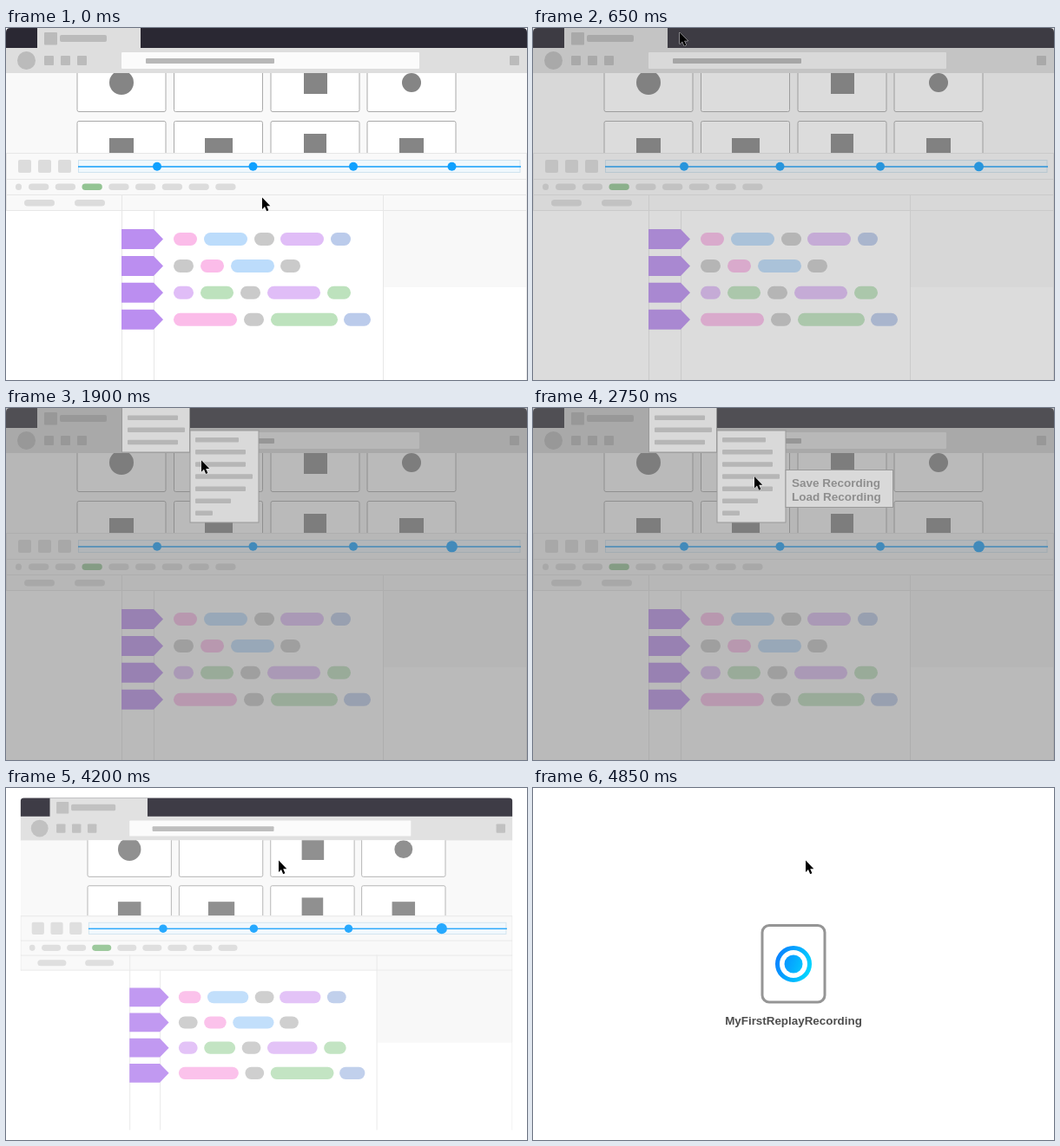
Animation, 600 px wide and 406 px high, one loop 7 s. Source, as an HTML page:

```html
<!DOCTYPE html>
<html lang="en">
<head>
<meta charset="utf-8">
<title>Save a recording</title>
<style>
  html, body { margin: 0; width: 100%; height: 100%; overflow: hidden; background: #fff; }
  svg { display: block; width: 600px; height: 406px; }
  text { font-family: "Liberation Sans", Arial, sans-serif; font-weight: bold; }
</style>
</head>
<body>
<svg id="stage" viewBox="0 0 600 406">
  <defs>
    <clipPath id="frame"><path d="M0 406V5Q0 0 5 0H595Q600 0 600 5V406Z"/></clipPath>
    <clipPath id="view"><rect y="52" width="600" height="92"/></clipPath>
    <linearGradient id="blue" gradientUnits="userSpaceOnUse" x1="281" y1="196" x2="319" y2="210">
      <stop offset="0" stop-color="#0a84ff"/><stop offset="1" stop-color="#00d5ff"/>
    </linearGradient>
  </defs>
  <g id="browser"><g id="page" clip-path="url(#frame)"></g></g>
  <g id="shade"><rect width="600" height="406" fill="#767676" fill-opacity=".5"/></g>
  <g id="menu"></g>
  <g id="submenu"></g>
  <g id="popup">
    <g id="popupBox"></g>
    <text id="save" x="298" y="90.5" font-size="13.5">Save Recording</text>
    <text x="298" y="106.7" font-size="13.5" fill="#8e8e8e">Load Recording</text>
  </g>
  <g id="file">
    <rect x="264" y="158.5" width="72" height="88.5" rx="8" fill="#fff" stroke="#959595" stroke-width="3"/>
    <circle cx="300" cy="203" r="18.5" fill="none" stroke="url(#blue)" stroke-width="5"/>
    <circle cx="300" cy="203" r="10.5" fill="url(#blue)"/>
    <text x="300" y="273" font-size="13.4" text-anchor="middle" fill="#4d4d4d">MyFirstReplayRecording</text>
  </g>
  <path id="cursor" d="M0 0V13.4L3 10.6L5.2 15.7L7.4 14.7L5.2 9.8H9.3Z" fill="#000"
        stroke="#fff" stroke-width=".8" paint-order="stroke"/>
</svg>
<script>
const NS = 'http://www.w3.org/2000/svg';
const $ = id => document.getElementById(id);

function add(parent, tag, attrs) {
  const el = document.createElementNS(NS, tag);
  for (const k in attrs) el.setAttribute(k, attrs[k]);
  return parent.appendChild(el);
}
// Rectangle given by its left, top, right and bottom edges.
const box = (parent, l, t, r, b, fill, rx = 0, extra = {}) =>
  add(parent, 'rect', { x: l, y: t, width: r - l, height: b - t, fill, rx, ...extra });
const dot = (parent, cx, cy, r, fill) => add(parent, 'circle', { cx, cy, r, fill });

function drawChrome(g) {
  const tone = '#bbb';
  box(g, 0, 0, 600, 406, '#fff');
  box(g, 0, 0, 600, 23, '#2a2833');
  box(g, 36, 0, 155, 24, '#dedede');
  box(g, 0, 23, 600, 52.5, '#dedede');
  box(g, 44, 5, 59, 19.5, tone, 1);
  box(g, 62, 8, 116, 16, tone, 2);
  dot(g, 23.5, 37.5, 10.5, tone);
  for (const x of [44, 63, 82, 580]) box(g, x, 32, x + 11, 43, tone, 1);
  box(g, 133, 28, 476, 47, '#fbfbfb', 1);
  box(g, 161, 35, 309, 41, '#b7b7b7', 1);
}

function drawSites(page) {
  const g = add(page, 'g', { 'clip-path': 'url(#view)' });
  const tone = '#858585';
  box(g, 0, 52, 600, 144, '#f9f9f9');
  for (const top of [39.5, 107.5])
    for (const x of [82, 193.5, 305, 416])
      box(g, x, top, x + 102, top + 57, '#fff', 2, { stroke: '#aaa', 'stroke-width': 1 });
  dot(g, 133, 63, 14, tone);
  box(g, 343, 50, 370, 76, tone);
  dot(g, 467, 63, 11, tone);
  for (const [l, t, r] of [[119, 127, 147], [229, 127, 261], [343, 122, 369], [453, 127, 481]])
    box(g, l, t, r, t + r - l, tone);
}

function drawTools(g) {
  const tone = '#dcdcdc';
  box(g, 0, 144, 600, 211, '#f9f9f9');
  box(g, 435, 211, 600, 299, '#f8f8f8');
  add(g, 'path', {
    d: 'M0 144.5H600M0 174.5H600M0 192.5H600M0 210.5H600M.5 144V211M599.5 144V406' +
       'M133.5 192V406M434.5 192V406M170.5 211V406',
    stroke: '#e7e7e7', fill: 'none'
  });
  for (const x of [14, 37, 60]) box(g, x, 152, x + 15, 167, tone, 2);
  box(g, 83.5, 152.5, 592, 166.5, '#f0f8fd', 0, { stroke: '#cfe3ef' });
  box(g, 83, 159.2, 593, 160.7, '#149ffb');
  box(g, 11, 179.5, 18, 187, tone, 3.5);
  for (let i = 0; i < 8; i++) {
    const x = 26 + i * 30.75;
    box(g, x, 179.5, x + 23.3, 187, i === 2 ? '#93c493' : tone, 3.75);
  }
  for (const x of [21, 79]) box(g, x, 198, x + 35, 205.5, tone, 3.75);
  return [174, 284.5, 400, 513.5].map(x => dot(g, x, 159.8, 5, '#0fa0ff')).pop();
}

function drawLog(g) {
  const tones = { k: '#fbbce9', b: '#bcdcfb', g: '#cacaca', p: '#e0bdf7', n: '#bde2bd', s: '#bbcbeb' };
  const rows = [
    ['kbgps', 193, 220, 228, 278, 286, 309, 316, 366, 374, 397],
    ['gkbg', 193, 216, 224, 251, 259, 309, 316, 339],
    ['pngpn', 193, 216, 224, 262, 270, 293, 301, 362, 370, 397],
    ['kgns', 193, 266, 274, 297, 305, 382, 389, 420]
  ];
  rows.forEach(([keys, ...edges], i) => {
    const y = 243.5 + i * 30.9;
    add(g, 'path', { d: `M133 ${y - 11.5}H170L181 ${y}L170 ${y + 11.5}H133Z`, fill: '#bb8ef0' });
    [...keys].forEach((k, j) =>
      box(g, edges[2 * j], y - 7.5, edges[2 * j + 1], y + 7.5, tones[k], 7.5));
  });
}

function panel(g, l, t, r, b) {
  box(g, l + .5, t + .5, r - .5, b - .5, '#d9d9d9', 0, { stroke: '#999' });
}
function bars(g, x, top, widths) {
  widths.forEach((w, i) => box(g, x, top + i * 14.1, x + w, top + i * 14.1 + 5.5, '#b6b6b6', 1));
}

const page = $('page');
drawChrome(page);
drawSites(page);
const lastDot = drawTools(page);
drawLog(page);
panel($('menu'), 133, -1, 212, 51.5);
bars($('menu'), 140, 8.5, [58, 66, 58]);
panel($('submenu'), 211.5, 25.5, 291.5, 132.5);
bars($('submenu'), 218, 34, [50, 58, 58, 66, 58, 41, 20]);
panel($('popupBox'), 290.5, 71, 415, 115);

const LOOP = 7000, TICK = 50;
const span = (t, a, b) => Math.min(1, Math.max(0, (t - a) / (b - a)));
const inOut = u => u < .5 ? 2 * u * u : 1 - 2 * (1 - u) ** 2;
const out = u => 1 - (1 - u) ** 2;
const mix = (a, b, u) => a + (b - a) * u;

// Cursor moves: start, end, x, y
const moves = [[400, 600, 169, 5], [1100, 1300, 168.5, 25], [1760, 2000, 255, 79], [2800, 3050, 314, 83.5]];

function cursorAt(t) {
  let x = 295, y = 195.5;
  for (const [a, b, tx, ty] of moves) {
    const u = inOut(span(t, a, b));
    x = mix(x, tx, u);
    y = mix(y, ty, u);
  }
  return [x, y];
}

function place(id, opacity, transform) {
  $(id).setAttribute('opacity', opacity);
  $(id).setAttribute('transform', transform);
}
const zoom = (s, x, y) => `translate(${x} ${y}) scale(${s}) translate(${-x} ${-y})`;

function render(t) {
  const leave = span(t, 3700, 3900);
  const slide = -16 * leave;
  const dim = span(t, 400, 900) * (1 - span(t, 3700, 3950) ** 1.94);
  place('shade', dim, `translate(0 ${slide})`);

  const drop = (id, u, from) =>
    place(id, u * (1 - leave), `translate(0 ${slide + from * (1 - u)})`);
  drop('menu', out(span(t, 900, 1050)), -16);
  drop('submenu', out(span(t, 1400, 1550)), -26);
  drop('popup', out(span(t, 2100, 2750)), -16);

  const grey = Math.round(mix(142, 72, span(t, 2850, 3250)));
  const pulse = 1 + .18 * Math.sin(Math.PI * span(t, 3350, 3600));
  $('save').setAttribute('fill', `rgb(${grey},${grey},${grey})`);
  $('save').setAttribute('transform', zoom(pulse, 349, 86));
  lastDot.setAttribute('r', mix(5, 6.5, span(t, 600, 750)));

  const shrink = span(t, 4150, 4650);
  place('browser', 1 - shrink, zoom(1 - .55 * shrink, 300, 203));
  const grow = out(span(t, 4400, 4850));
  place('file', grow, zoom(mix(.6, 1, grow), 300, 203));

  $('cursor').setAttribute('transform', `translate(${cursorAt(t)})`);
}

const start = performance.now();
function tick() {
  const t = (performance.now() - start) % LOOP;
  render(Math.floor(t / TICK) * TICK);
  requestAnimationFrame(tick);
}
tick();
</script>
</body>
</html>
```
